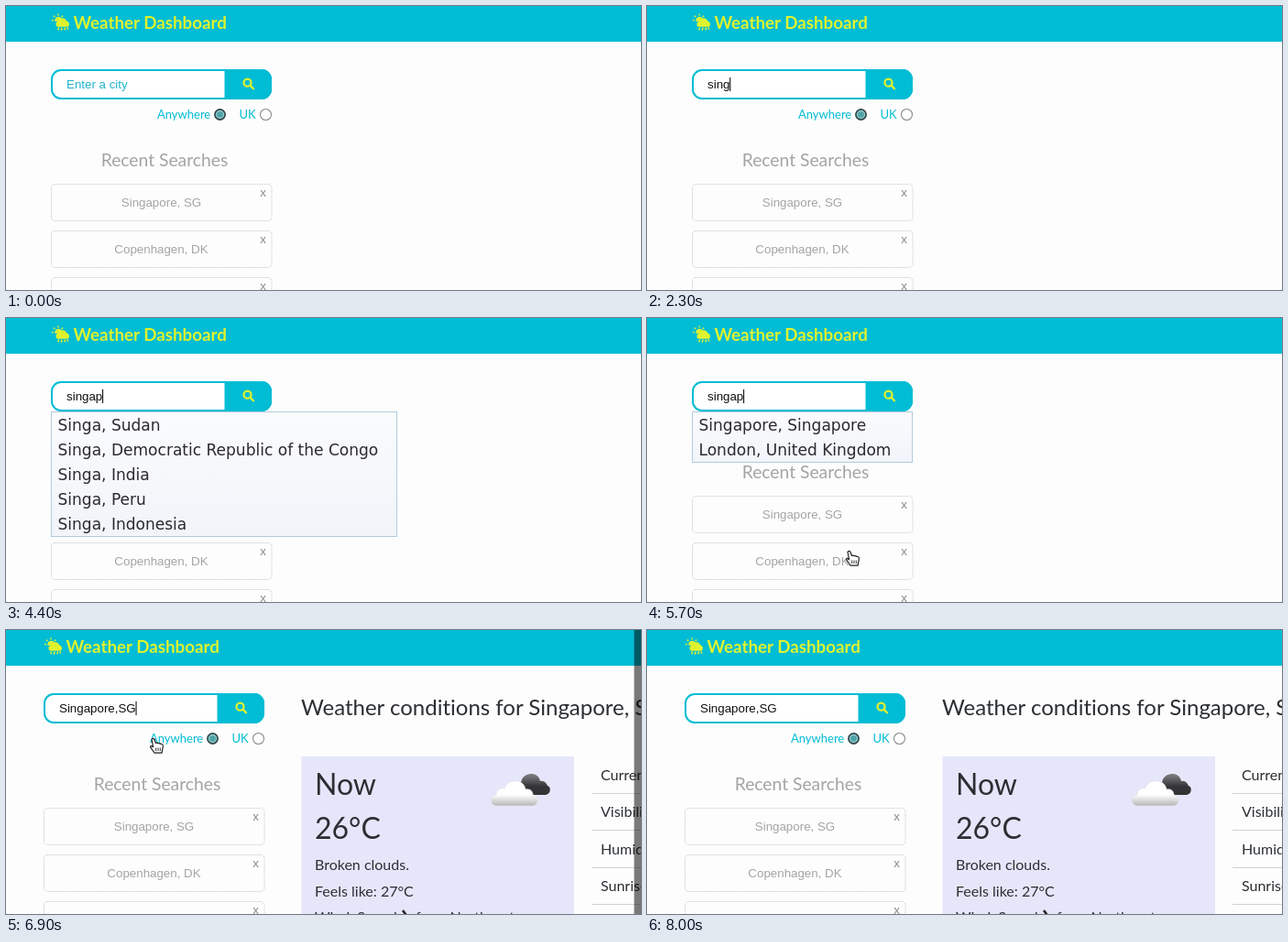
Recreate the animation shown at these times as an HTML page. Size 693x310 px, loop 8.1 s.

```html
<!DOCTYPE html>
<html lang="en">
<head>
<meta charset="utf-8">
<title>Weather Dashboard</title>
<style>
  html, body { margin: 0; width: 100%; height: 100%; overflow: hidden; background: #fdfdfd; }
  svg { display: block; width: 693px; height: 310px; }
  text { white-space: pre; font-variant-ligatures: none; }
  .lato { font-family: Lato, sans-serif; }
  .arial { font-family: "Liberation Sans", Arial, sans-serif; font-size: 13.33px; }
  .menu { font-family: "DejaVu Sans", sans-serif; font-size: 17.05px; fill: #2c2a31; }
  .yellow { fill: #dff22f; }
  .teal { fill: #00bcd4; }
  .gray { fill: #a4a4a4; }
  .dark { fill: #2b2f33; }
  .card text { font-size: 16px; }
  .card .big { font-size: 32px; }
  .dotted { fill: none; stroke: #c4c4c4; stroke-dasharray: 1 1; }
</style>
</head>
<body>
<svg viewBox="0 0 693 310" xmlns="http://www.w3.org/2000/svg">
  <defs>
    <linearGradient id="menuFill" x2="0" y2="1">
      <stop offset="0" stop-color="#fafbfd"/>
      <stop offset="1" stop-color="#f1f4f9"/>
    </linearGradient>
    <linearGradient id="cloudFill" x2="0" y2="1">
      <stop offset=".55" stop-color="#fff"/>
      <stop offset="1" stop-color="#b4b4b8"/>
    </linearGradient>
    <linearGradient id="stormFill" x2="0" y2="1">
      <stop offset=".1" stop-color="#77777a"/>
      <stop offset=".6" stop-color="#343436"/>
    </linearGradient>
  </defs>
  <rect width="693" height="310" fill="#fdfdfd"/>
  <rect class="teal" width="693" height="39"/>

  <g id="page">
    <g fill="none" stroke="#dff22f" stroke-width="1.6" stroke-linecap="round">
      <path class="yellow" d="M53.6 17a4 4 0 0 1 7-3.600q-3 .6-3.800 3.200-2 0-3.200.4z" stroke="none"/>
      <path d="M57 9v1M52.2 11l.8.8M50.3 15.6h1.200M61.8 11l-.8.8" stroke-width="1.400"/>
      <path class="yellow" d="M56.500 22a2.500 2.500 0 0 1 .4-4.600 4.600 4.600 0 0 1 8.700-.4 2.900 2.900 0 0 1 1.700 5z"/>
      <path d="M57.500 24.200l-.6 1.400M61 24.200l-.6 1.800M64.500 24.200l-.6 1.400M67.500 24l-.4 1"/>
    </g>
    <text class="lato yellow" x="73.5" y="25" font-size="18.75" font-weight="700">Weather Dashboard</text>

    <g id="form">
      <rect x="50" y="70" width="239" height="31" rx="10" fill="#fff" stroke="#00bcd4" stroke-width="2"/>
      <path class="teal" d="M238.5 69H279a11 11 0 0 1 11 11v11a11 11 0 0 1-11 11h-40.5z"/>
      <g fill="none" stroke="#dff22f" stroke-width="2.3" stroke-linecap="round">
        <circle cx="263.5" cy="83.7" r="4"/>
        <path d="M266.7 86.9l3.3 3.3"/>
      </g>
      <text id="entry" class="arial" x="66" y="90"></text>
      <path id="caret" d="M0 78v15" stroke="#111" stroke-width="1.1"/>
    </g>

    <g class="lato teal" font-size="13">
      <text x="165" y="123">Anywhere</text>
      <text x="254.5" y="123">UK</text>
    </g>
    <circle cx="233.5" cy="118.5" r="5.6" fill="#8cc9c9" stroke="#34484b" stroke-width="1.7"/>
    <circle cx="233.5" cy="118.5" r="3.3" fill="#4fa3a6"/>
    <circle cx="283.5" cy="118.5" r="6" fill="#fff" stroke="#8a8a8a" stroke-width="1.1"/>

    <text class="lato gray" x="173" y="175" font-size="19.3" text-anchor="middle">Recent Searches</text>
    <g id="recent"></g>

    <g id="menu">
      <rect id="menuBox" x="49.5" y="102.5" fill="url(#menuFill)" stroke="#b2cbdb"/>
      <rect id="menuActive" x="50" width="239.5" height="27" fill="#3baae3"/>
      <g id="menuItems"></g>
    </g>
  </g>

  <g id="results" class="lato dark">
    <text x="322" y="93" font-size="24">Weather conditions for Singapore, SG</text>
    <g class="card">
      <rect x="322.5" y="138" width="297.5" height="180" fill="#e6e6fa"/>
      <text class="big" x="337" y="180">Now</text>
      <text class="big" x="337" y="228">26°C</text>
      <text x="337" y="262">Broken clouds.</text>
      <text x="337" y="291">Feels like: 27°C</text>
      <text x="337" y="319">Wind: Speed</text>
      <path d="M433 306l5 7" stroke="#222" stroke-width="2.6"/>
      <text x="447" y="319">from Northeast</text>
      <path d="M556 180c-3-7 2-12 6-12 0-13 19-15 21-3 5-1 7 3 8 5 4 1 4 9-2 10z" fill="url(#stormFill)"/>
      <path d="M535 192c-8-1-8-11 0-12 0-6 5-8 9-7 3-11 21-11 23 1 6-1 8 3 8 6 7 1 7 11 0 12z" fill="url(#cloudFill)" stroke="#e4e4ea" stroke-width=".7"/>
      <g id="facts"></g>
    </g>
  </g>

  <rect id="shade" width="693" height="310" fill="#000"/>
  <rect id="edge" x="685.5" width="8" height="310" fill="#000" opacity=".52"/>

  <g id="pointer" stroke-linejoin="round">
    <g id="hand" stroke="#222" stroke-width="1.2">
      <path d="M-2.500 1.500Q-1.500-.6.4 1.200L2 5.500q1.600-1 2.700.3 1.600-.7 2.600.6 2.200-.4 2.500 1.700c.2 3-1 4.500-1.200 8H.4C-.6 13.700-3 12-4 9.600q.5-2 3.100.1z" fill="#fff"/>
      <path d="M2.200 10.500v3.500M4.500 10.500v3.500M6.800 10.500v3.500" stroke-width=".9"/>
    </g>
    <path id="arrow" d="M0 0v14l3.2-3 2.2 5 2-1-2.2-4.7h4.5z" fill="#111" stroke="#fff"/>
    <path id="beam" d="M-2.5-7q2.5 0 2.5 2 0-2 2.5-2M0-5V5M-2.5 7q2.5 0 2.5-2 0 2 2.5 2" fill="none" stroke="#222" stroke-width="1.1"/>
  </g>
</svg>
<script>
const LOOP = 8100, STEP = 100;
const $ = id => document.getElementById(id);
const within = (t, spans) => spans.some(([a, b]) => t >= a && t < b);
const show = (id, on) => $(id).setAttribute('display', on ? 'inline' : 'none');
const put = (id, attrs) => Object.entries(attrs).forEach(([k, v]) => $(id).setAttribute(k, v));

// Piecewise-linear value of keys [time, value...] at t.
function track(keys, t, channel = 1) {
  if (t <= keys[0][0]) return keys[0][channel];
  for (let i = 1; i < keys.length; i++) {
    const a = keys[i - 1], b = keys[i];
    if (t <= b[0]) return a[channel] + (b[channel] - a[channel]) * (t - a[0]) / (b[0] - a[0]);
  }
  return keys[keys.length - 1][channel];
}

const TYPED = [[0, ''], [1800, 's'], [2000, 'si'], [2200, 'sin'], [2300, 'sing'],
  [2800, 'singa'], [4400, 'singap'], [6200, 'Singapore,SG']];
const CARET = [[800, 1300], [1800, 3300], [3800, 4300], [4400, 4900], [5400, 5900], [6200, 7100], [7600, 8000]];
const MENUS = [
  { from: 4100, to: 5200, width: 377, items: ['Sudan', 'Democratic Republic of the Congo', 'India', 'Peru', 'Indonesia'].map(c => 'Singa, ' + c) },
  { from: 5200, to: 6200, width: 240, items: ['Singapore, Singapore', 'London, United Kingdom'] }
];
const ZOOM = [[500, 1], [800, 1.05], [1100, 1.05], [1300, 1]];
const SHADE = [[6200, 0], [6400, .5]];
const POINTER = [
  [[200, 172, 300], [700, 118, 86], [1000, 114, 88], [1100, 94, 247], [1200, 86, 325]],
  [[5700, 221.5, 254], [6000, 172, 132], [6200, 161.5, 118], [7100, 161.5, 118], [7600, 70, 325]]
];

['Singapore, SG', 'Copenhagen, DK', ''].forEach((city, i) => {
  const y = 194.5 + 51 * i;
  $('recent').innerHTML += `<rect class="dotted" x="49.5" y="${y}" width="240.5" height="40" rx="4"/>
    <text class="arial gray" x="169.5" y="${y + 24.5}" text-anchor="middle">${city}</text>
    <text class="arial" fill="#888" x="280.5" y="${y + 13}" text-anchor="middle">x</text>`;
});

['Current', 'Visibility', 'Humidity', 'Sunrise'].forEach((label, i) => {
  const y = 164 + 40.3 * i;
  $('facts').innerHTML += `<text x="649" y="${y}">${label}</text>
    <path d="M639 ${Math.round(y + 14) + .5}h60" stroke="#d2d2d2"/>`;
});

function drawForm(t) {
  const typed = TYPED.filter(([at]) => at <= t).pop()[1];
  const entry = $('entry'), zoom = track(ZOOM, t);
  entry.textContent = typed || 'Enter a city';
  entry.setAttribute('fill', typed ? '#111' : '#1fb4cc');
  const caretX = 66.3 + (typed ? entry.getComputedTextLength() : 0);
  put('caret', { transform: `translate(${caretX} 0)` });
  show('caret', within(t, CARET));
  put('form', { transform: `translate(169.5 85.5) scale(${zoom}) translate(-169.5 -85.5)` });
}

function drawMenu(t, pointer) {
  const menu = MENUS.find(m => t >= m.from && t < m.to);
  show('menu', !!menu);
  if (!menu) return;
  const row = pointer ? Math.floor((pointer.y - 103) / 27) : -1;
  const active = row >= 0 && row < menu.items.length;
  put('menuBox', { width: menu.width, height: menu.items.length * 27 + 1 });
  show('menuActive', active);
  if (active) put('menuActive', { y: 103 + row * 27 });
  $('menuItems').innerHTML = menu.items.map((item, i) =>
    `<text class="menu" x="56.5" y="${123 + 27 * i}"${i === row ? ' style="fill:#fff"' : ''}>${item}</text>`).join('');
}

function pointerAt(t) {
  const keys = POINTER.find(k => t >= k[0][0] && t <= k[k.length - 1][0]);
  return keys && { x: track(keys, t, 1), y: track(keys, t, 2) };
}

function drawPointer(t, p) {
  show('pointer', !!p);
  if (!p) return;
  const overField = p.y > 69 && p.y < 102;
  const overLink = within(p.y, [[110, 126], [194, 235], [245, 286]]) || (t >= 5700 && t < 6200 && p.y < 157);
  show('beam', overField);
  show('hand', !overField && overLink);
  show('arrow', !overField && !overLink);
  put('pointer', { transform: `translate(${p.x} ${p.y})` });
}

function draw(t) {
  const loaded = t >= 6700, pointer = pointerAt(t);
  put('page', { transform: `translate(${loaded ? -8 : 0} 0)` });
  show('results', loaded);
  put('shade', { opacity: t < 6900 ? track(SHADE, t) : 0 });
  show('edge', within(t, [[6900, 7100]]));
  drawForm(t);
  drawMenu(t, pointer);
  drawPointer(t, pointer);
}

const start = performance.now();
function tick() {
  const t = (performance.now() - start) % LOOP;
  draw(Math.floor(t / STEP) * STEP);
  requestAnimationFrame(tick);
}
tick();
</script>
</body>
</html>
```
